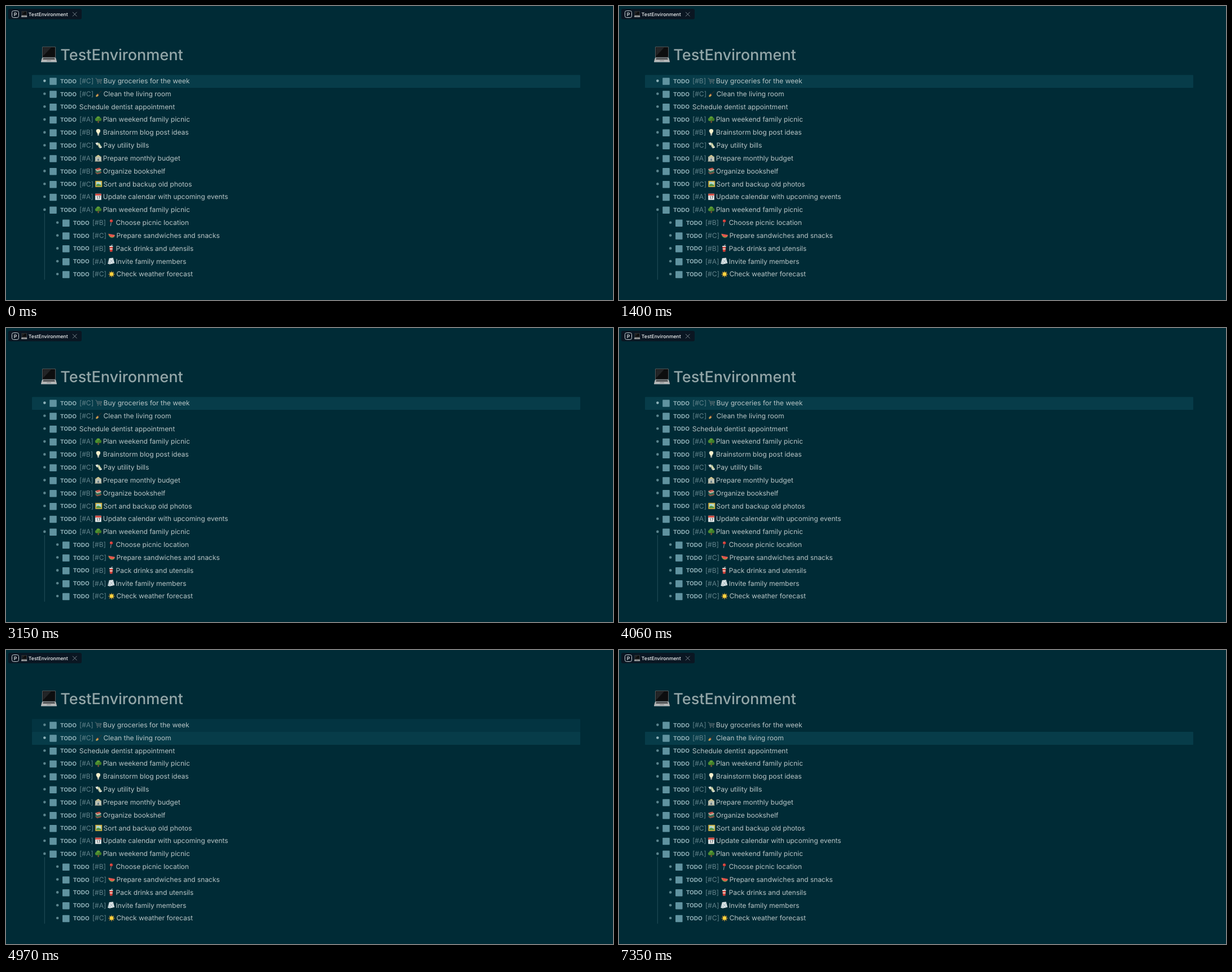
An HTML page for the animation above (8000 ms loop, 1075 px wide and 521 px high).

```html
<!DOCTYPE html>
<html lang="en">
<head>
<meta charset="utf-8">
<title>Task priorities</title>
<style>
  html, body { margin: 0; width: 100%; height: 100%; overflow: hidden; background: #002b36; }
  svg { display: block; }
  text { font-family: Inter, sans-serif; white-space: pre; text-rendering: geometricPrecision; }
  .body { font-size: 12px; fill: #b8c5c6; }
  .todo { font-size: 10px; font-weight: 700; fill: #92b3ba; }
  .tag { font-size: 12px; fill: #62838b; }
  .title { font-size: 27px; font-weight: 500; fill: #93a6a8; }
  .tab { font-size: 8.7px; font-weight: 500; fill: #f2f5f6; }
  .band { fill: #073c49; }
</style>
</head>
<body>
<svg id="stage" width="1075" height="521" viewBox="0 0 1075 521">
  <defs>
    <g id="laptop">
      <rect x="2" y="0" width="24" height="19.500" rx="1.500" fill="#6d6f70"/>
      <rect x="2.800" y=".8" width="22.400" height="18" rx="1" fill="#0d0e0f"/>
      <path d="M3.500 17V1.500H18Z" fill="#232527"/>
      <path d="M2 19.500H26L28 26.500H0Z" fill="#b4b5b5"/>
      <path d="M4 20.300H24L24.800 23H3.200Z" fill="#4b4d4f"/>
      <path d="M10.500 23.700H17.500L18 26H10Z" fill="#9a9b9c"/>
      <rect y="26.300" width="28" height="1.300" rx=".6" fill="#d6d7d7"/>
    </g>
  </defs>
  <rect x="4" y="5" width="130" height="18.500" rx="3" fill="#0a1622"/>
  <rect x="10.500" y="8.500" width="12" height="12" rx="3" fill="none" stroke="#c9d1d6"/>
  <text class="tab" x="13.800" y="17.700">P</text>
  <use href="#laptop" transform="translate(27 9.300) scale(.37)"/>
  <text class="tab" x="39.800" y="17.500">TestEnvironment</text>
  <path d="M118 10.800l7.500 7.500m0-7.500l-7.500 7.500" stroke="#87939b" stroke-width=".9"/>
  <use href="#laptop" transform="translate(62 72)"/>
  <text class="title" x="96.300" y="96.200">TestEnvironment</text>
  <g id="list"></g>
</svg>
<script>
const LOOP = 8000, STEP = 70, TOP = 132.6, PITCH = 22.83;

const path = (d, fill) => `<path d="${d}" fill="${fill}"/>`;
const line = (d, color, width = 1) =>
  `<path d="${d}" fill="none" stroke="${color}" stroke-width="${width}"/>`;
const dot = (x, y, r, fill) => `<circle cx="${x}" cy="${y}" r="${r}" fill="${fill}"/>`;
const box = (x, y, w, h, fill) =>
  `<rect x="${x}" y="${y}" width="${w}" height="${h}" fill="${fill}"/>`;

// Small pictures, each in a 12 by 12 box
const icons = {
  cart: line('M0 1.500H2L4 8.500H11M2.500 3.500H11.500L10.500 6.500H3.500M5 3.500V7M7.500 3.500V7M10 3.500V7', '#68777b', .8) +
    dot(4.5, 10.4, 1, '#59676b') + dot(9.8, 10.4, 1, '#59676b'),
  broom: line('M5.500 6.500L11 .8', '#49372b', .9) + path('M3.700 6L6 8.200C5.300 10 3.800 11.300 1.500 11.500L.8 9.800Z', '#c9a050') +
    line('M3.700 6L6.100 8.300', '#9b4536', 1.1),
  tree: box(5, 7, 2.2, 5, '#795334') + dot(6, 3.5, 3.3, '#5e9e37') +
    dot(3.3, 5.8, 2.9, '#4d8e2e') + dot(8.8, 5.8, 2.9, '#417d28'),
  bulb: path('M6 0C10.500 0 10.500 4.500 8.200 6.500L7.500 8.800H4.500L3.800 6.500C1.500 4.500 1.500 0 6 0Z', '#f8efcb') +
    box(4.6, 8.7, 2.8, 2.8, '#aeb2ad'),
  money: path('M0 2L4.500 1L7 4L3 6.500ZM12 10L8 11.500L5 8L9 5.500Z', '#e9ebe2') +
    path('M3.500 3.500L7 1.500L10.500 8L7 10.500Z', '#a9bb8e') + path('M5 4.500L7 3.400L9 7.600L7.200 8.800Z', '#e4dfbd'),
  bank: path('M0 4L6 0L12 4Z', '#d7ca91') + box(.8, 4, 10.4, 7, '#9cacb0') +
    [1, 4, 7, 9.6].map(x => box(x, 4, 1.4, 7, '#e3dcbd')).join('') +
    box(4.8, 7, 2.4, 4, '#526c7c') + box(0, 10.7, 12, 1.3, '#b8b29a'),
  books: path('M1 2L8 0L11 2.500L4 4.500Z', '#c65348') + path('M1 2V4L4 6.500L11 4.500V2.500L4 4.500Z', '#d9cdb5') +
    path('M1 4.700L4 7.200L11 5.200V7L4 9L1 6.500Z', '#4e9368') + path('M1 7.300L4 9.800L11.500 7.500V9.500L4 11.800L1 9.300Z', '#9c5b48'),
  picture: box(0, .5, 12, 11, '#d5ad38') + box(1.7, 2.2, 8.6, 7.6, '#a9d6d8') +
    path('M1.700 8C4 4.500 6 5 10.300 8V9.800H1.700Z', '#579543') + dot(8, 4, 1, '#f5e184'),
  calendar: box(.7, .5, 10.6, 11, '#edf0ef') + box(.7, .5, 10.6, 3.2, '#d64b42') +
    line('M3.300 5.500L4.500 5V10M6.500 5.200H9L7.200 10', '#37434a', .9),
  pin: line('M6 6L5 12', '#a8b3b6', .9) + dot(6.3, 3, 2.7, '#d43c37') + dot(5.5, 2.2, .8, '#f2867d'),
  melon: path('M0 3.500L12 5.500C11 11.500 2.500 12.500 0 3.500Z', '#5aa048') +
    path('M.3 2.800L11.800 5C10.500 10.300 3 11 .3 2.800Z', '#f05a50') +
    dot(4, 5.3, .5, '#542a27') + dot(7, 6.3, .5, '#542a27'),
  drink: line('M6 2L7 0H8.500', '#e8e9e5', .9) + path('M3 2.500H9L8.200 12H3.800Z', '#d4423b') +
    box(2.8, 1.7, 6.4, 1.7, '#eceeea') + path('M3.400 6H8.600L8.400 8H3.600Z', '#f0d5c9'),
  letter: path('M2.500 .8L9.500 0L12 9.500L3.500 11.500L0 10.500Z', '#dce5e7') +
    line('M2.500 2L7 6L9.800 1M3.500 10.500L6 6L11 9.500', '#8ba0aa', .7) +
    line('M0 6.500H3M0 8.500H3', '#7b929c', .7),
  sun: Array.from({length: 8}, (_, i) =>
    `<path d="M5 2.300L6 0L7 2.300Z" fill="#efa52f" transform="rotate(${i * 45} 6 6)"/>`).join('') +
    dot(6, 6, 3.3, '#ffd23e')
};

const tasks = [
  ['C', 'cart', 'Buy groceries for the week'],
  ['C', 'broom', 'Clean the living room'],
  ['', '', 'Schedule dentist appointment'],
  ['A', 'tree', 'Plan weekend family picnic'],
  ['B', 'bulb', 'Brainstorm blog post ideas'],
  ['C', 'money', 'Pay utility bills'],
  ['A', 'bank', 'Prepare monthly budget'],
  ['B', 'books', 'Organize bookshelf'],
  ['C', 'picture', 'Sort and backup old photos'],
  ['A', 'calendar', 'Update calendar with upcoming events'],
  ['A', 'tree', 'Plan weekend family picnic'],
  ['B', 'pin', 'Choose picnic location'],
  ['C', 'melon', 'Prepare sandwiches and snacks'],
  ['B', 'drink', 'Pack drinks and utensils'],
  ['A', 'letter', 'Invite family members'],
  ['C', 'sun', 'Check weather forecast']
];

const tagText = p => p && `[#${p}]`;
const tagShift = p => `translate(${p === 'C' ? .8 : 0} 0)`;

function taskRow([priority, icon, label], i) {
  const indent = i > 10 ? 22.8 : 0;
  const picture = icon && `<g transform="translate(157.400 -5.900)">${icons[icon]}</g>`;
  return `<g transform="translate(${indent} ${TOP + i * PITCH})">
    <circle class="bullet" cx="68.300" cy="0" r="2.300" fill="#5b858e"/>
    <rect x="77.200" y="-5.300" width="12.500" height="12.500" rx=".8" fill="#6093a0"/>
    <text class="todo" x="95.900" y="4.100">TODO</text>
    <text class="tag" x="129.900" y="4.400">${tagText(priority)}</text>
    <g class="rest" transform="${tagShift(priority)}">${picture}
      <text class="body" x="${icon ? 171.8 : 129.8}" y="4.400">${label}</text></g>
  </g>`;
}

const band = y => `<rect class="band" x="46" y="${y}" width="971" height="22.800" rx="1"/>`;
document.getElementById('list').innerHTML = band(122.3) + band(145.1) +
  line('M68.300 367V485', '#24505a') + tasks.map(taskRow).join('');

const all = name => document.querySelectorAll('.' + name);
const bands = all('band'), bullets = all('bullet'), tags = all('tag'), rests = all('rest');

// Times at which a row takes its next priority
const changes = [
  [[0, 'C'], [70, 'A'], [1400, 'B'], [2940, 'C'], [4340, 'A']],
  [[0, 'C'], [6090, 'A'], [7350, 'B']]
];

function draw(now) {
  const t = now % LOOP;
  changes.forEach((list, row) => {
    const priority = list.filter(([start]) => start <= t).pop()[1];
    tags[row].textContent = tagText(priority);
    rests[row].setAttribute('transform', tagShift(priority));
  });
  // The second row lights up at once while the first fades in four steps
  const k = Math.max(0, Math.min(4, Math.floor((t - 4900) / STEP)));
  bands[0].style.opacity = (1 - k / 4) ** 2;
  bands[1].style.opacity = k ? 1 : 0;
  bullets[0].setAttribute('fill', k ? '#5b858e' : '#8fb3ba');
  bullets[1].setAttribute('fill', k ? '#8fb3ba' : '#5b858e');
}

const begin = performance.now();
function tick() {
  draw(performance.now() - begin);
  requestAnimationFrame(tick);
}
tick();
</script>
</body>
</html>
```
